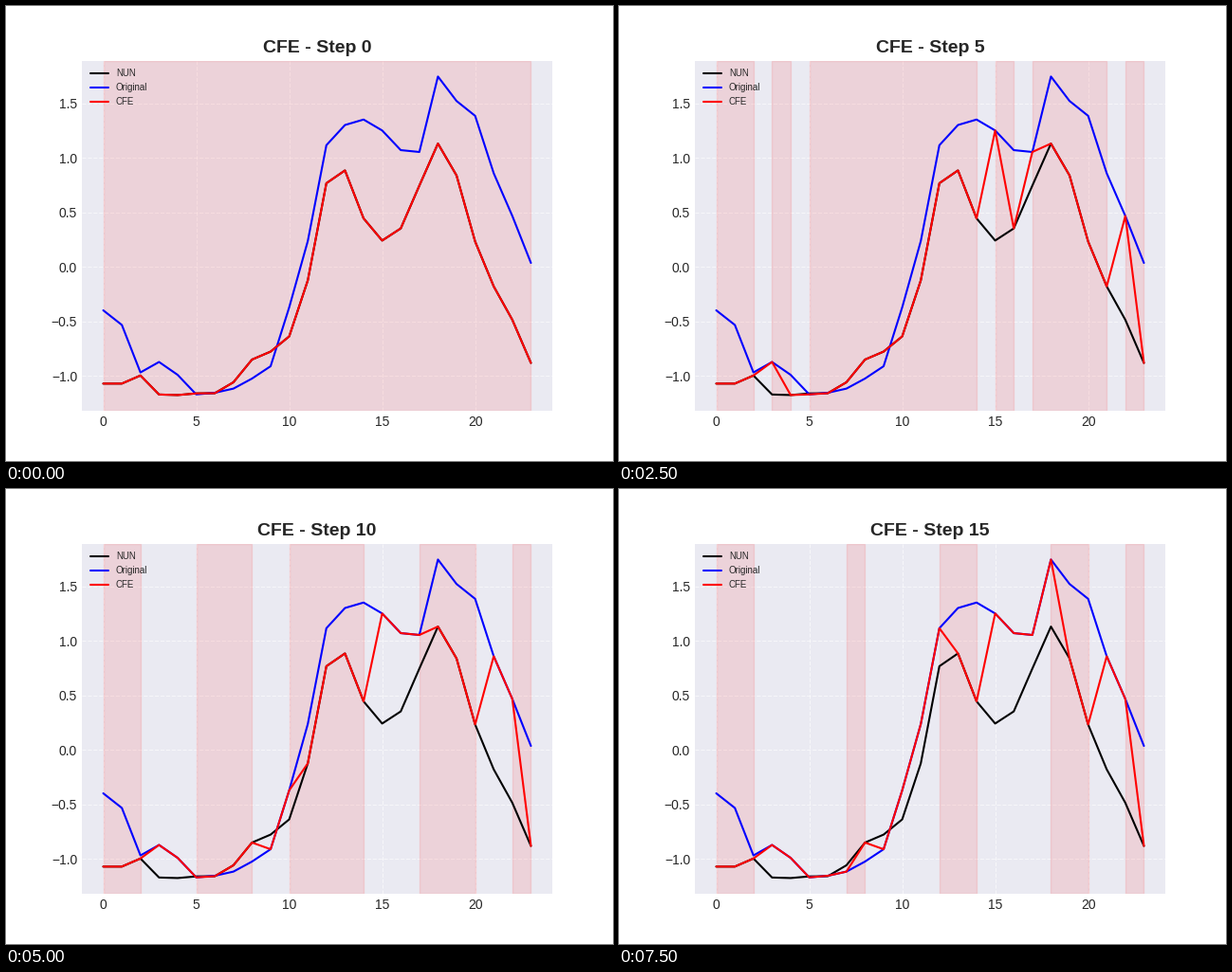
Animation of 640 by 480 pixels, one loop 8 s. Source, as a matplotlib script:

```python
import matplotlib.pyplot as plt
import numpy as np
from matplotlib.animation import FuncAnimation

INK = "0.15"
STEP_MS = 500

plt.rcParams.update({
    "font.family": "Liberation Sans",
    "font.size": 10,
    "text.color": INK,
    "axes.facecolor": "#EAEAF2",
    "axes.axisbelow": True,
    "lines.linewidth": 1.5,
    "lines.solid_capstyle": "round",
})

query = np.array([
    -0.397, -0.531, -0.966, -0.870, -0.988, -1.167, -1.152, -1.114,
    -1.022, -0.909, -0.370, 0.237, 1.115, 1.300, 1.350, 1.250,
    1.070, 1.053, 1.744, 1.520, 1.384, 0.858, 0.467, 0.037])
neighbour = np.array([
    -1.068, -1.068, -0.994, -1.168, -1.173, -1.158, -1.156, -1.056,
    -0.848, -0.775, -0.636, -0.123, 0.767, 0.884, 0.445, 0.242,
    0.353, 0.745, 1.130, 0.838, 0.233, -0.178, -0.484, -0.879])

# Order in which points are taken back from the query series
order = [15, 17, 22, 3, 5, 21, 10, 4, 16, 9, 12, 6, 18, 11, 7]
last = len(query) - 1
x = np.arange(last + 1)

fig, ax = plt.subplots(figsize=(6.4, 4.8), dpi=100)
ax.plot(x, neighbour, color="black", label="NUN")
ax.plot(x, query, color="blue", label="Original")
cfe, = ax.plot(x, neighbour, color="red", label="CFE")

ax.set_xlim(-0.05 * last, 1.05 * last)
ax.set_ylim(-1.3186, 1.8898)
ax.set_xticks(range(0, 21, 5))
ax.set_yticks(np.arange(-1, 1.6, 0.5))
ax.tick_params(length=0, pad=3.5, labelcolor=INK)
ax.grid(True, color="white", linestyle="--", linewidth=0.8, alpha=0.6)
ax.spines[:].set_visible(False)
ax.legend(loc="upper left", fontsize=7, frameon=False)
title = ax.set_title("", fontsize=14, fontweight="bold")

spans = []


def runs(flipped):
    """Yield the stretches between neighbouring flipped points."""
    start = 0
    for i in sorted(flipped):
        if i - 1 > start:
            yield start, i - 1
        start = i
    if start < last:
        yield start, last


def update(step):
    flipped = order[:step]
    values = neighbour.copy()
    values[flipped] = query[flipped]
    cfe.set_ydata(values)
    title.set_text(f"CFE - Step {step}")
    while spans:
        spans.pop().remove()
    for a, b in runs(flipped):
        spans.append(ax.axvspan(a, b, color="red", alpha=0.1))
    return [cfe, title, *spans]


anim = FuncAnimation(fig, update, frames=len(order) + 1, init_func=lambda: update(0),
                     interval=STEP_MS, repeat=True, repeat_delay=0, blit=False)
plt.show()
```
